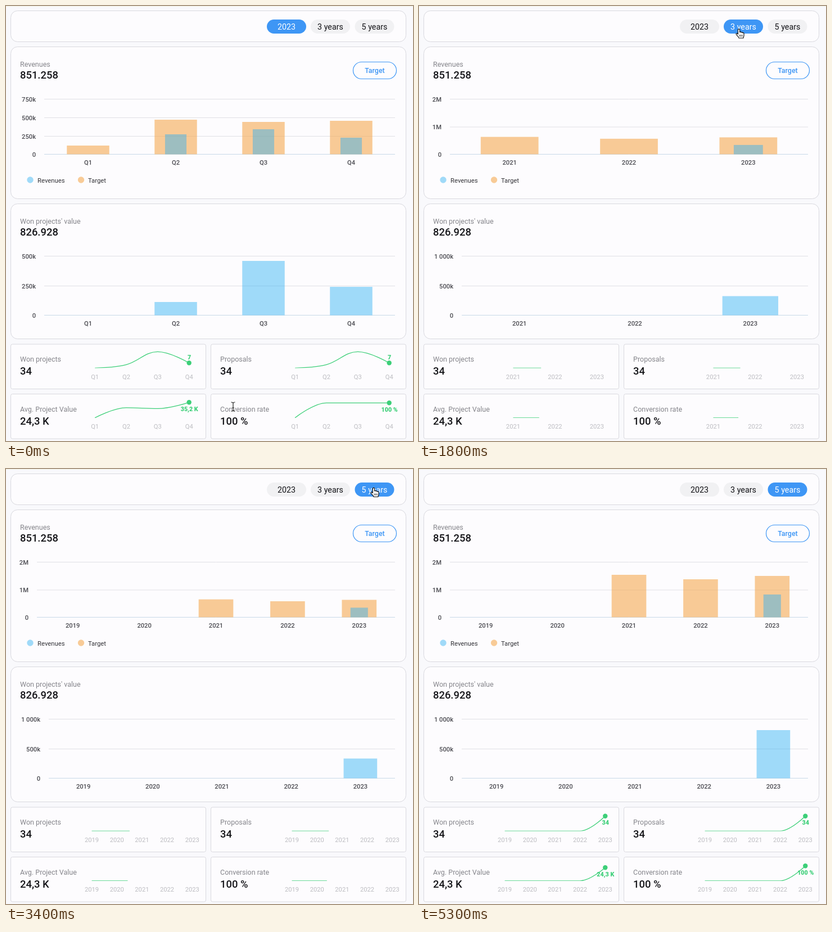
Animation, 724 px wide and 773 px high, one loop 5.4 s. Source, as an HTML page with a canvas:

```html
<!DOCTYPE html>
<html lang="en">
<head>
<meta charset="utf-8">
<title>Sales dashboard</title>
<style>
  html, body { margin: 0; width: 100%; height: 100%; overflow: hidden; background: #f9f9fc; }
  canvas { display: block; }
</style>
</head>
<body>
<canvas id="stage" width="724" height="773"></canvas>
<script>
const ctx = document.getElementById('stage').getContext('2d');
const LOOP = 5400, STEP = 100;
const COLORS = {
  page: '#f9f9fc', card: '#fdfcfe', border: '#d9d9df', grid: '#e0e0e5', axis: '#c8d9e8',
  accent: '#3e96f5', pill: '#f1f1f3', pillHover: '#dcdcdf', ink: '#141418', muted: '#85858b',
  label: '#4a4a50', faint: '#bdbdc2', green: '#3ccf78',
  target: 'rgba(245,170,82,.6)', revenue: 'rgba(46,176,241,.45)'
};

const QUARTERS = ['Q1', 'Q2', 'Q3', 'Q4'];
const THREE = ['2021', '2022', '2023'];
const FIVE = ['2019', '2020', ...THREE];
const pad = (list, n, v) => Array(n - list.length).fill(v).concat(list);

// Bar values are heights in pixels, spark values are heights above the spark baseline.
function yearView(cats, start, press) {
  const n = cats.length;
  return {
    cats, start, press,
    revenue: { left: 55, ticks: ['2M', '1M', '0'], ys: [165.5, 215, 263.5],
      target: pad([75.5, 67.5, 73.5], n, 0), value: pad([40.5], n, 0) },
    won: { left: 76, ticks: ['1 000k', '500k', '0'], value: pad([85.5], n, 0) },
    sparks: [26.5, 26.5, 23.5, 26.5].map(v => pad([v], n, 0)),
    labels: ['34', '34', '24,3 K', '100 %'], labelDy: [11.5, 11.5, 11.5, 11.5]
  };
}
const VIEWS = [
  { cats: QUARTERS, start: -2000, press: -2000,
    revenue: { left: 68, ticks: ['750k', '500k', '250k', '0'], ys: [165.5, 198.5, 231.5, 263.5],
      target: [15.5, 61.5, 57.5, 59.5], value: [0, 35.5, 44.5, 29.5] },
    won: { left: 68, ticks: ['500k', '250k', '0'], value: [0, 23.5, 96.5, 50.5] },
    sparks: [[0, 6, 29, 9], [0, 6, 29, 9], [0, 18, 16.5, 27.5], [0, 26.5, 26.5, 26.5]],
    labels: ['7', '7', '35,2 K', '100 %'], labelDy: [-10, -10, 11.5, 11.5] },
  yearView(THREE, 1358, 1460),
  yearView(FIVE, 2950, 3060)
];
const BUTTONS = [['2023', 464], ['3 years', 542], ['5 years', 620.5]];
const CARDS = [
  ['Won projects', '34', 0, 0], ['Proposals', '34', 356, 0],
  ['Avg. Project Value', '24,3 K', 0, 88.5], ['Conversion rate', '100 %', 356, 88.5]
];
const TRACK = [
  [0, 404, 712], [100, 404, 712], [800, 558, 98], [1150, 569, 41],
  [2150, 569, 41], [2400, 623, 38], [2700, 654, 33.5], [LOOP, 654, 33.5]
];
const ARROW = new Path2D('M0 0V13.6L3.1 10.8L5.2 15.7L7.5 14.7L5.4 9.9H9.5Z');
const HAND = new Path2D('M-1.6 9V1.4A1.6 1.6 0 0 1 1.6 1.4V5.6C2 4.6 4 4.7 4.3 6C5 5.2 6.5 5.4 6.8 6.8' +
  'C7.5 6 9 6.4 9 8V11C9 13 8 14 8 16H0C0 14-3 12-4.7 9.5C-5.5 8-4 7-2.8 8Z');

const clamp = v => Math.max(0, Math.min(1, v));
const easeSine = v => (1 - Math.cos(Math.PI * clamp(v))) / 2;
const lastStarted = (t, key) => VIEWS.filter(v => t >= v[key]).length - 1;

function text(str, x, midY, size, color, { weight = 400, align = 'left' } = {}) {
  ctx.font = `${weight} ${size}px Roboto, sans-serif`;
  ctx.textAlign = align;
  ctx.fillStyle = color;
  ctx.fillText(str, x, midY + size * 0.355);
}
function box(x, y, w, h, r, fill, stroke, lineWidth = 1) {
  ctx.beginPath();
  ctx.roundRect(x, y, w, h, r);
  if (fill) { ctx.fillStyle = fill; ctx.fill(); }
  if (stroke) { ctx.strokeStyle = stroke; ctx.lineWidth = lineWidth; ctx.stroke(); }
}
function dot(x, y, r, color) {
  ctx.fillStyle = color;
  ctx.beginPath();
  ctx.arc(x, y, r, 0, 7);
  ctx.fill();
}
function hline(x1, x2, y, color) {
  ctx.strokeStyle = color;
  ctx.lineWidth = 1;
  ctx.beginPath();
  ctx.moveTo(x1, y);
  ctx.lineTo(x2, y);
  ctx.stroke();
}

function drawGrid(chart, cats, ys, catY) {
  const right = 692, slot = (right - chart.left) / cats.length;
  ys.forEach((y, i) => {
    hline(chart.left, right, y, i === ys.length - 1 ? COLORS.axis : COLORS.grid);
    text(chart.ticks[i], chart.left - 15, y + 0.5, 11.2, COLORS.label, { weight: 500, align: 'right' });
  });
  cats.forEach((c, i) =>
    text(c, chart.left + slot * (i + 0.5), catY, 11.2, COLORS.label, { weight: 500, align: 'center' }));
  return slot;
}
function drawBars(chart, heights, slot, share, base, grow, color) {
  ctx.fillStyle = color;
  heights.forEach((h, i) => {
    const w = slot * share;
    if (h) ctx.fillRect(chart.left + slot * (i + 0.5) - w / 2, base - h * grow, w, h * grow);
  });
}

// Smooth curve whose control points never overshoot the neighbouring values.
function splinePath(pts) {
  const mix = (a, b) => (1.5 * a + b) / 2.5;
  const limit = (c, a, b) => Math.max(Math.min(a, b), Math.min(Math.max(a, b), c));
  const ctrl = pts.map((p, i) => {
    const a = pts[i - 1], b = pts[i + 1];
    if (!a || !b) return { lx: p.x, ly: p.y, rx: p.x, ry: p.y };
    const lx = mix(p.x, a.x), rx = mix(p.x, b.x);
    const slope = (mix(p.y, b.y) - mix(p.y, a.y)) / (rx - lx);
    const ly = limit(p.y - slope * (p.x - lx), a.y, p.y);
    const ry = limit(2 * p.y - ly, b.y, p.y);
    return { lx, rx, ry, ly: 2 * p.y - ry };
  });
  ctx.beginPath();
  ctx.moveTo(pts[0].x, pts[0].y);
  for (let i = 1; i < pts.length; i++) {
    const a = ctrl[i - 1], b = ctrl[i];
    ctx.bezierCurveTo(a.rx, a.ry, b.lx, b.ly, pts[i].x, pts[i].y);
  }
}
function drawSpark(view, k, dx, dy, t) {
  const left = 130.2 + dx, width = 223.4, base = 643.3 + dy;
  const slot = width / view.cats.length;
  const pts = view.sparks[k].map((v, i) => ({ x: left + slot * (i + 0.5), y: base - v }));
  const end = pts[pts.length - 1];
  const shown = easeSine((t - view.start - 13 - k * 5) / 1000);
  view.cats.forEach((c, i) => text(c, pts[i].x, 659 + dy, 11.2, COLORS.faint, { align: 'center' }));

  ctx.save();
  ctx.beginPath();
  ctx.rect(left, base - 40, width * shown, 40.2);
  ctx.clip();
  splinePath(pts);
  ctx.strokeStyle = COLORS.green;
  ctx.lineWidth = 1.3;
  ctx.stroke();
  dot(end.x, end.y, 4.2, COLORS.green);
  ctx.restore();

  ctx.globalAlpha = clamp((t - view.start - 1000) / 40);
  text(view.labels[k], end.x + 0.5, end.y + view.labelDy[k], 10.7, COLORS.green, { weight: 800, align: 'center' });
  ctx.globalAlpha = 1;
}

function drawTooltip(t) {
  const alpha = t < 340 ? 0 : 1 - clamp((t - 930) / 200);
  if (!alpha) return;
  ctx.save();
  ctx.globalAlpha = alpha;
  ctx.beginPath();
  ctx.moveTo(424.5, 458.5);
  for (const [x, y] of [[452, 458.5], [458, 453], [464, 458.5], [492, 458.5], [492, 488.5], [424.5, 488.5]])
    ctx.lineTo(x, y);
  ctx.closePath();
  ctx.shadowColor = 'rgba(0,0,0,.35)';
  ctx.shadowBlur = 3;
  ctx.shadowOffsetX = ctx.shadowOffsetY = 1;
  ctx.fillStyle = '#dcebf5';
  ctx.fill();
  ctx.shadowColor = 'transparent';
  ctx.strokeStyle = '#93c9e8';
  ctx.lineWidth = 1;
  ctx.stroke();
  text('465.046', 457.5, 473.5, 13.4, '#333338', { weight: 700, align: 'center' });
  ctx.restore();
}

function pointerAt(t) {
  const i = TRACK.findIndex(k => t < k[0]);
  const [t0, x0, y0] = TRACK[i - 1], [t1, x1, y1] = TRACK[i];
  const p = easeSine((t - t0) / (t1 - t0));
  return { x: x0 + (x1 - x0) * p, y: y0 + (y1 - y0) * p };
}
function drawPointer({ x, y }, kind) {
  ctx.save();
  ctx.translate(x, y);
  ctx.lineJoin = 'round';
  if (kind === 'text') {
    const beam = new Path2D('M-3.5-8Q0-8 0-6Q0-8 3.5-8M0-6V6M-3.5 8Q0 8 0 6Q0 8 3.5 8M-2 2H2');
    for (const [w, c] of [[2.6, '#fff'], [1.2, '#222']]) {
      ctx.lineWidth = w;
      ctx.strokeStyle = c;
      ctx.stroke(beam);
    }
  } else {
    const hand = kind === 'hand', shape = hand ? HAND : ARROW;
    ctx.lineWidth = hand ? 1.2 : 2;
    ctx.strokeStyle = hand ? '#111' : '#fff';
    ctx.fillStyle = hand ? '#fff' : '#000';
    if (hand) ctx.fill(shape);
    ctx.stroke(shape);
    if (!hand) ctx.fill(shape);
    else {
      ctx.lineWidth = 0.9;
      ctx.stroke(new Path2D('M1.2 10V13.5M3.6 10V13.5M6 10V13.5'));
    }
  }
  ctx.restore();
}

function draw(t) {
  const view = VIEWS[lastStarted(t, 'start')];
  const active = lastStarted(t, 'press');
  const pointer = pointerAt(t), visible = t < 4800;
  const hover = BUTTONS.findIndex(([, x]) =>
    visible && pointer.x > x + 5 && pointer.x < x + 65 && pointer.y > 24 && pointer.y < 49);

  ctx.fillStyle = COLORS.page;
  ctx.fillRect(0, 0, 724, 773);
  ctx.fillStyle = '#f3f3e5';
  ctx.fillRect(0, 0, 724, 1);
  for (const [y, h] of [[8.5, 55], [72.5, 270], [351.5, 240]])
    box(8.5, y, 703, h, 12, COLORS.card, COLORS.border);

  BUTTONS.forEach(([name, x], i) => {
    const fill = i === active ? COLORS.accent : i === hover ? COLORS.pillHover : COLORS.pill;
    box(x, 24, 70, 25, 12.5, fill);
    text(name, x + 35, 36.5, 14.3, i === active ? '#fff' : COLORS.ink, { align: 'center' });
  });

  text('Revenues', 25, 103.5, 12.5, COLORS.muted);
  text('851.258', 25, 122.5, 18.4, COLORS.ink, { weight: 500 });
  box(617.5, 99.5, 77, 30, 15, null, COLORS.accent, 1.2);
  text('Target', 656, 114.5, 12.5, COLORS.accent, { weight: 500, align: 'center' });

  const rev = view.revenue, grow = easeSine((t - view.start) / 1000);
  const slot = drawGrid(rev, view.cats, rev.ys, 278.5);
  drawBars(rev, rev.target, slot, 0.484, 263.5, grow, COLORS.target);
  drawBars(rev, rev.value, slot, 0.244, 263.5, grow, COLORS.revenue);
  dot(43, 309, 5.7, '#a0daf8');
  text('Revenues', 56, 309.5, 11.3, '#333338');
  dot(133.5, 309, 5.7, '#f8cb97');
  text('Target', 146, 309.5, 11.3, '#333338');

  text("Won projects' value", 25, 382.5, 12.5, COLORS.muted);
  text('826.928', 25, 401.5, 18.4, COLORS.ink, { weight: 500 });
  const wonSlot = drawGrid(view.won, view.cats, [444.5, 497.5, 549.5], 564.5);
  drawBars(view.won, view.won.value, wonSlot, 0.484, 549.5,
    easeSine((t - view.start - 8) / 1000), COLORS.revenue);

  CARDS.forEach(([name, value, dx, dy], k) => {
    box(8.5 + dx, 601 + dy, 347, 79.5, 3, COLORS.card, COLORS.border);
    text(name, 25 + dx, 628 + dy, 12.5, COLORS.muted);
    text(value, 25 + dx, 648.5 + dy, 18.4, COLORS.ink, { weight: 500 });
    drawSpark(view, k, dx, dy, t);
  });

  drawTooltip(t);
  if (visible) drawPointer(pointer, hover >= 0 ? 'hand' : pointer.y > 704 ? 'text' : 'arrow');
}

const begin = performance.now();
function frame() {
  const t = (performance.now() - begin) % LOOP;
  draw(Math.floor(t / STEP) * STEP);
  requestAnimationFrame(frame);
}
frame();
</script>
</body>
</html>
```
